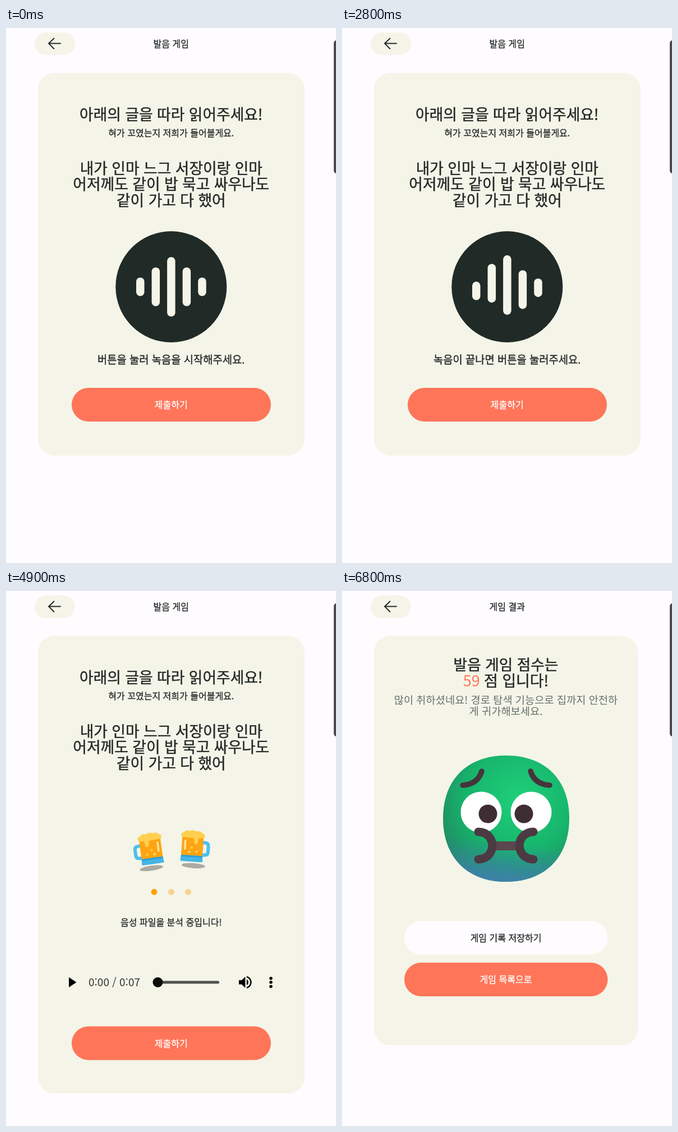
Write an HTML page that moves like this. It is 588 px wide and 953 px high and loops after 6900 ms.

```html
<!DOCTYPE html>
<html lang="ko">
<head>
<meta charset="utf-8">
<style>
html, body { margin: 0; width: 100%; height: 100%; overflow: hidden; background: #fefcff; }
svg { display: block; width: 588px; height: 953px; }
text { font-family: "Noto Sans CJK KR", "Noto Sans CJK", "Noto Sans KR", sans-serif; }
</style>
</head>
<body>
<svg id="stage" viewBox="0 0 588 953"></svg>
<script>
const INK = '#252a28', CARD = '#f4f5e8', CORAL = '#ff7559', DARK = '#202a27', PLUM = '#45353c';
const LOOP = 6900, REC = 400, DONE = 4100, LOAD = 4500, RESULT = 5700;

// Text centred on (x, y); a thin outline gives the medium weight
const text = (s, x, y, size, fill = INK, outline = 0.018, extra = '') =>
  `<text x="${x}" y="${y + size * 0.38}" font-size="${size}" fill="${fill}" stroke="${fill}" stroke-width="${size * outline}" text-anchor="middle" ${extra}>${s}</text>`;
const box = (x, y, w, h, r, fill, extra = '') =>
  `<rect x="${x}" y="${y}" width="${w}" height="${h}" rx="${r}" fill="${fill}" ${extra}/>`;
const dot = (x, y, r, fill, extra = '') => `<circle cx="${x}" cy="${y}" r="${r}" fill="${fill}" ${extra}/>`;
const line = (d, stroke, w) =>
  `<path d="${d}" fill="none" stroke="${stroke}" stroke-width="${w}" stroke-linecap="round" stroke-linejoin="round"/>`;

// amplitude, period, phase at 1200 ms, height
const BARS = [[8, 605, .67, 33], [8, 653, .405, 69], [8, 630, .393, 106], [8, 565, .561, 69], [4.5, 625, .5, 33]];
const DOT_X = [264, 294.5, 324.5];

const mug = `
  <ellipse cx="-4" cy="33" rx="21" ry="4.5" fill="#abaaa4"/>
  <path d="M-18 -9H-22Q-28.500 -9 -28.500 -3V7Q-28.500 13 -22 13H-18" fill="none" stroke="#4dbfee" stroke-width="6"/>
  <path d="M-19 -20H19L19 16H-19Z" fill="#ffa412"/>
  <path d="M-19 15H19L20 24Q20 26 18 26H-18Q-20 26 -20 24Z" fill="#45b5e6"/>
  <path d="M-19 15H19V18H-19Z" fill="#2f9fd2"/>
  <path d="M-20 -17Q-24 -24 -16 -26Q-12 -31 -6 -28Q1 -32 7 -28Q13 -31 16 -26Q24 -24 20 -17L-2 -16Q-2 -5 -6 -5Q-10 -5 -10 -16Z" fill="#ffd04f"/>
  <path d="M13 -11V4" stroke="#ffe3a0" stroke-width="3.500" stroke-linecap="round"/>
  ${dot(-8, 8, 2.2, '#ffd04f')}${dot(1, 1, 2.2, '#ffd04f')}${dot(5, 9, 2.5, '#ffd04f')}`;

const player = `<g id="player">
  <path d="M112 688L125.500 697L112 706Z" fill="#000"/>
  ${text('0:00 / 0:07', 193, 697, 19, '#333', 0)}
  ${box(262, 694.5, 118, 5, 2.5, '#505050')}${dot(270.5, 697, 9, '#0a0c0a')}
  <path transform="translate(411.200 681.900) scale(1.260)" d="M3 9v6h4l5 5V4L7 9H3zm13.500 3c0-1.770-1.020-3.290-2.500-4.030v8.050c1.480-.730 2.500-2.250 2.500-4.020zM14 3.230v2.060c2.890.860 5 3.540 5 6.710s-2.110 5.850-5 6.710v2.060c4.010-.910 7-4.490 7-8.770s-2.990-7.860-7-8.770z"/>
  ${[690, 697, 704.5].map(y => dot(472, y, 2.8, '#000')).join('')}</g>`;

const head = 'M292 293C362 293 405 336 405 405C405 474 362 518 292 518C223 518 180 474 180 405C180 336 223 293 292 293Z';
const face = `
  <path d="${head}" fill="url(#skin)"/><path d="${head}" fill="url(#shade)"/>
  ${line('M249 321Q242 344 215 346', PLUM, 9.5)}${line('M336 321Q343 344 370 346', PLUM, 9.5)}
  ${dot(248, 394, 36.5, '#fff')}${dot(337, 394, 36.5, '#fff')}
  ${dot(260, 397, 16.5, '#3f2d34')}${dot(324, 397, 16.5, '#3f2d34')}
  ${line('M270 454H315', '#5b454e', 16)}
  ${line('M243 429C276 430 276 477 243 478', '#4c3a42', 15)}
  ${line('M341 429C308 430 308 477 341 478', '#4c3a42', 15)}`;

stage.innerHTML = `
  <defs>
    <radialGradient id="skin" cx=".6" cy=".35" r=".75">
      <stop offset="0" stop-color="#1fd07a"/><stop offset=".55" stop-color="#17b56c"/><stop offset="1" stop-color="#21825f"/>
    </radialGradient>
    <linearGradient id="shade" x1=".55" y1="0" x2=".45" y2="1">
      <stop offset=".68" stop-color="#3f7fb0" stop-opacity="0"/><stop offset="1" stop-color="#437fb5" stop-opacity=".9"/>
    </linearGradient>
  </defs>
  ${box(51, 8, 72, 40, 20, CARD)}${line('M97 27.5H76M85.5 18.500L76 27.5L85.5 37', INK, 2)}
  ${text('', 294.3, 28, 16, INK, 0.018, 'id="head"')}
  ${box(584, 22, 12, 237, 5, '#4a4a4a')}
  ${box(57, 80, 475, 682, 29, CARD, 'id="card"')}
  <g id="game">
    ${text('아래의 글을 따라 읽어주세요!', 294.3, 153.5, 26.75)}
    ${text('혀가 꼬였는지 저희가 들어볼게요.', 294.3, 186.5, 16)}
    ${['내가 인마 느그 서장이랑 인마', '어저께도 같이 밥 묵고 싸우나도', '같이 가고 다 했어']
      .map((s, i) => text(s, 294.3, 249.5 + i * 28.6, 26.75)).join('')}
    <g id="recorder">
      ${dot(294.3, 461, 99, DARK)}
      ${BARS.map(([, , , h], i) => box(232 + i * 27.55, 461 - h / 2, 14.5, h, 7.25, CARD, 'class="bar"')).join('')}
      ${text('', 294.3, 591, 18.75, INK, 0.018, 'id="hint"')}
    </g>
    <g id="loading">
      <g class="mug">${mug}</g><g class="mug">${mug}</g>
      ${DOT_X.map(x => dot(x, 536, 5.5, '#ffa312', 'class="dot"')).join('')}
      ${text('음성 파일을 분석 중입니다!', 294.3, 589.5, 16)}
    </g>
    ${player}
    <g id="submit">
      ${box(117, 641, 355, 60, 30, CORAL)}${text('제출하기', 294.3, 671, 16, '#fff')}
      ${box(117, 641, 355, 60, 0, '#33b5e5', 'id="tap"')}
    </g>
  </g>
  <g id="result">
    ${text('발음 게임 점수는', 292, 131, 26.7)}
    ${text(`<tspan fill="${CORAL}" stroke="none">59</tspan> 점 입니다!`, 292, 160, 26.9)}
    ${text('많이 취하셨네요! 경로 탐색 기능으로 집까지 안전하', 292, 194, 18.7, '#65706b', 0)}
    ${text('게 귀가해보세요.', 292, 214, 18.7, '#65706b', 0)}
    ${face}
    ${box(111, 588, 362.5, 59.5, 29.75, '#fefcff')}${text('게임 기록 저장하기', 292, 617.5, 16)}
    ${box(111, 662, 362.5, 60, 30, CORAL)}${text('게임 목록으로', 292, 692, 16, '#fff')}
  </g>`;

const $ = id => document.getElementById(id);
const all = name => [...document.querySelectorAll('.' + name)];
const bars = all('bar'), mugs = all('mug'), dots = all('dot');
const show = (id, on) => $(id).setAttribute('display', on ? 'inline' : 'none');
const move = (el, x, y, more = '') => el.setAttribute('transform', `translate(${x} ${y}) ${more}`);
const clamp = v => Math.max(0, Math.min(1, v));

function draw(t) {
  const recording = t >= REC && t < DONE, done = t >= DONE, loading = t >= LOAD, result = t >= RESULT;
  show('game', !result);
  show('result', result);
  show('recorder', !loading);
  show('loading', loading);
  show('player', done);
  $('head').textContent = result ? '게임 결과' : '발음 게임';
  $('hint').textContent = recording ? '녹음이 끝나면 버튼을 눌러주세요.' : '버튼을 눌러 녹음을 시작해주세요.';
  $('card').setAttribute('width', result ? 470.5 : 475);
  $('card').setAttribute('height', result ? 729 : loading ? 815 : done ? 799 : 681.5);
  move($('player'), 0, loading ? 0 : -16);
  move($('submit'), 0, loading ? 134.5 : done ? 118 : 0);
  $('tap').setAttribute('opacity', loading ? 0.115 * clamp(1 - (t - LOAD) / 300) : 0);

  bars.forEach((bar, i) => {
    const [amp, period, phase] = BARS[i];
    move(bar, 0, recording ? amp * Math.sin(2 * Math.PI * (phase + (t - 1200) / period)) : 0);
  });

  // Mugs swing towards each other and back
  const k = 1.2 - 2.1 * (1 - Math.cos(1.127 + 2 * Math.PI * (t - LOAD) / 1200));
  move(mugs[0], 251 - 2.5 * k, 474 + 4.5 * k, `rotate(${10 + 6 * k})`);
  move(mugs[1], 338 + 2 * k, 466.5 + 3.5 * k, `rotate(${-11 - 5 * k}) scale(-1 1)`);

  dots.forEach((d, i) => {
    const q = (0.55 + (t - LOAD) / 700 - 0.2 * i + 10) % 1;
    d.setAttribute('opacity', 0.42 + 0.58 * clamp(Math.min(q, 0.5 - q) / 0.12));
  });
}

const start = performance.now();
function tick() {
  draw((performance.now() - start) % LOOP);
  requestAnimationFrame(tick);
}
tick();
</script>
</body>
</html>
```
